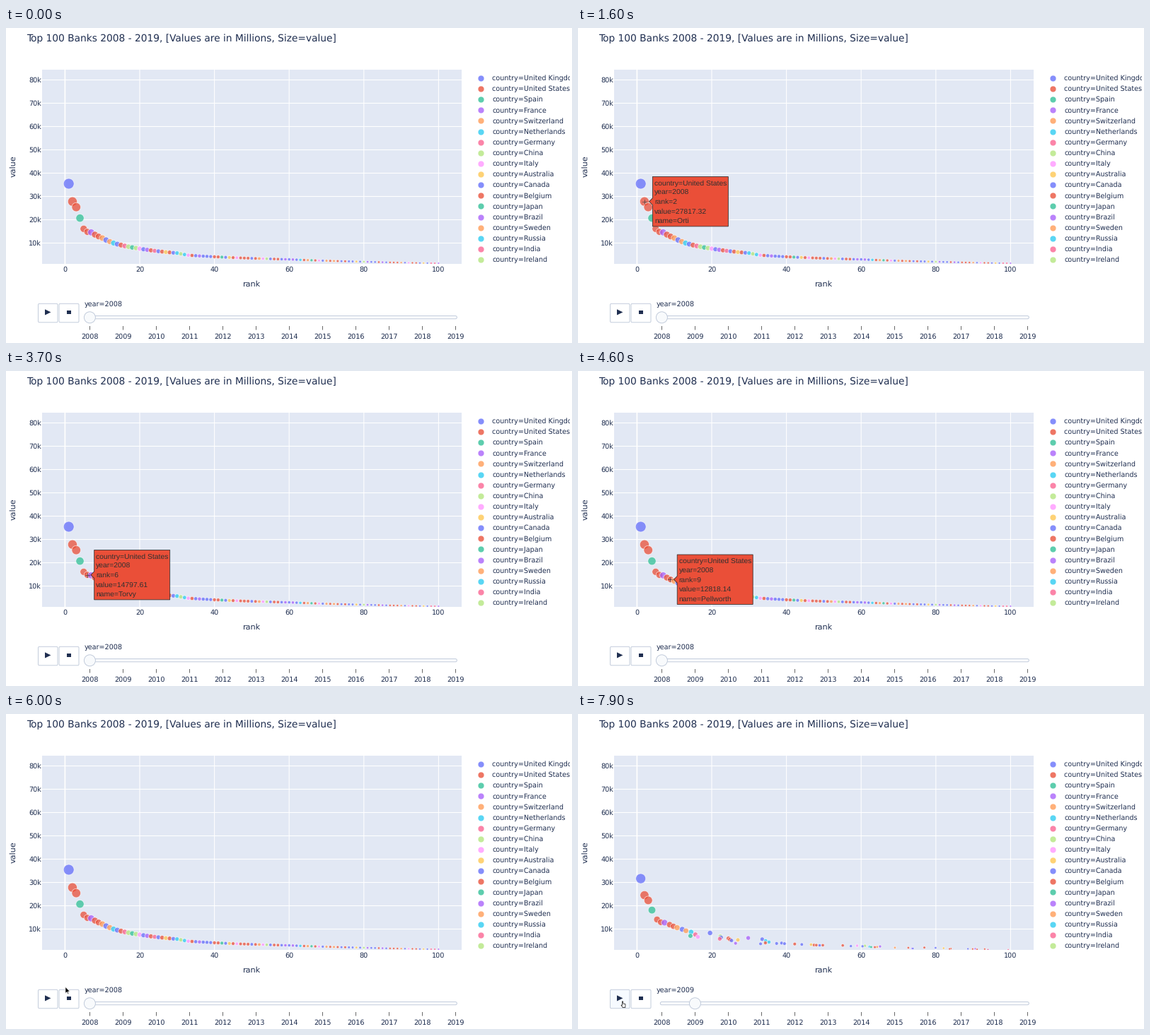
A matplotlib script that plays this animation: 800x446 px, repeating every 8000 ms.

```python
import numpy as np
import matplotlib.pyplot as plt
from matplotlib.animation import FuncAnimation
from matplotlib.patches import Circle, FancyBboxPatch, Polygon, Rectangle

W, H, DPI = 800, 446, 100
PX = 72 / DPI
FRAMES, STEP = 80, 100

INK, BORDER, PLOT_BG, DARK = "#1f2e50", "#bec8d9", "#e2e8f4", "#303030"
PALETTE = dict(zip("brgpocklmy", [
    "#636efa", "#ea4f38", "#30c096", "#a75ffa", "#ff9a54",
    "#2acbf2", "#fa6290", "#b2e67c", "#ff95ff", "#fec64e"]))
CODES = list(PALETTE)
COUNTRIES = ["United Kingdom", "United States", "Spain", "France", "Switzerland",
             "Netherlands", "Germany", "China", "Italy", "Australia", "Canada",
             "Belgium", "Japan", "Brazil", "Sweden", "Russia", "India", "Ireland"]
BANKS = ["Crownhall", "Orti", "Bank of Meldora", "Banco Velmar", "Fenwold",
         "Torvy", "Credit Lorvane", "Hadley Rusk", "Pellworth",
         "Credit Savrel", "Ashmere", "Zolbank", "DRN"]

plt.rcParams.update({"font.family": "DejaVu Sans", "text.hinting": "none"})
rng = np.random.default_rng(8)


def sx(rank):
    return 83.4 + 5.28 * np.asarray(rank, float)


def sy(value):
    return 337.5 - 0.0033 * np.asarray(value, float)


def diameter(value):
    return 14.9 * np.sqrt(np.asarray(value, float) / 35456)


def curve(rank):
    """Value by rank: piecewise power law through a few key banks."""
    knots = [1, 2, 3, 4, 5, 6, 7, 10, 13, 20, 30, 33, 60, 80, 100]
    levels = [35456.28, 27817.32, 25417.05, 20718.44, 16108.91, 14797.61, 14593.26,
              12139.77, 10006.54, 7600, 5700, 4800, 3000, 2000, 1330]
    return np.exp(np.interp(np.log(rank), np.log(knots), np.log(levels)))


# First year
ranks = np.arange(1, 101)
values = curve(ranks)
codes = list("brrgrrprrobocbrklglmbpr")
codes += list(rng.choice(list("rrrrrbbbgpcklmoy"), 100 - len(codes)))

# Second year: leaders slip a little, the rest reshuffle, some drop out
leaders = ranks <= 12
stays = leaders | (rng.random(100) < 0.62)
slips = np.where(leaders, np.maximum((ranks - 2) // 3, 0),
                 np.rint(rng.normal(2, 9, 100)))
next_ranks = np.clip(ranks + slips, 1, 100)
next_values = values * (0.65 + 0.06 / ranks)

fig = plt.figure(figsize=(W / DPI, H / DPI), dpi=DPI, facecolor="white")
ax = fig.add_axes([0, 0, 1, 1])
ax.set(xlim=(0, W), ylim=(H, 0))
ax.axis("off")


def label(x, y, text, size=9.6, ha="left", color=INK, **kw):
    return ax.text(x, y + 0.33 * size, text, fontsize=size * PX, ha=ha,
                   va="baseline", color=color, **kw)


def rule(xs, ys, color, width, **kw):
    ax.plot(xs, ys, color=color, lw=width * PX, solid_capstyle="butt", snap=False, **kw)


def box(x, y, w, h, r, **kw):
    style = f"round,pad=0,rounding_size={r}"
    return ax.add_patch(FancyBboxPatch((x, y), w, h, boxstyle=style,
                                       lw=0.9 * PX, ec=BORDER, **kw))


# Plot area
area = ax.add_patch(Rectangle((51, 59), 593, 275, fc=PLOT_BG, lw=0, zorder=0))
for r in range(0, 101, 20):
    rule([sx(r)] * 2, [59, 334], "white", 1.7 if r == 0 else 1.1, zorder=1)
    label(sx(r), 341.5, str(r), ha="center")
for k in range(10, 81, 10):
    y = sy(k * 1000)
    rule([51, 644], [y, y], "white", 1.1, zorder=1)
    label(50, y, f"{k}k", ha="right")

label(28.8, 15, "Top 100 Banks 2008 - 2019, [Values are in Millions, Size=value]", 13.8)
label(347.5, 362.6, "rank", 11.2, ha="center")
ax.text(10, 195.7, "value", fontsize=11.2 * PX, rotation=90, ha="center",
        va="center", color=INK)

# Legend
legend_area = Rectangle((650, 50), 146.5, 300, transform=ax.transData)
for i, country in enumerate(COUNTRIES):
    y = 71 + 15.12 * i
    ax.scatter([671.3], [y], s=(8.8 * PX) ** 2, c=PALETTE[CODES[i % 10]],
               alpha=0.78, edgecolors="white", linewidths=0.6 * PX)
    entry = label(687, y, f"country={country}", clip_on=True)
    entry.set_clip_path(legend_area)

# Controls
play = box(45.5, 390.3, 27.5, 26.5, 1.6, fc="white")
box(75, 390.3, 28, 26.5, 1.6, fc="white")
ax.add_patch(Polygon([(55, 398.3), (63.4, 402.4), (55, 406.5)], fc=INK, lw=0, zorder=3))
ax.add_patch(Rectangle((86.3, 399.9), 5.3, 5.3, fc=INK, lw=0, zorder=3))
box(116.3, 407.6, 521, 4.2, 2, fc="#f9fbfd")
for i in range(12):
    x = 118.4 + 47 * i
    rule([x, x], [422, 427.5], "#444444", 0.8)
    label(x, 436.7, str(2008 + i), ha="center")
grip = ax.add_patch(Circle((118.4, 409.8), 8, fc="#f8fafc", ec=BORDER,
                           lw=0.9 * PX, zorder=4))
year_label = label(110.5, 391.2, "")

dots = ax.scatter([], [], linewidths=0.75 * PX, edgecolors="white", alpha=0.75, zorder=5)
dots.set_clip_path(area)

# Hover label
tip = ax.add_patch(Polygon([(0, 0)] * 3, lw=0.8 * PX, zorder=8))
lines = [label(0, 0, "", 10.35, family="Liberation Sans", zorder=9) for _ in range(5)]

# Pointer shapes
cross = ax.plot([], [], color="#444444", lw=0.7 * PX, zorder=10)[0]
ARROW = np.array([(0, 0), (0, 9.5), (2.2, 7.5), (3.8, 10.8), (5.2, 10.2),
                  (3.7, 7), (6.6, 6.8)])
HAND = np.array([(-1.6, -3), (-0.4, -3), (-0.2, 0), (3, 0.8), (2.8, 5.5),
                 (-0.8, 5.5), (-3, 2.2), (-1.4, 2.2)])
pointer = ax.add_patch(Polygon(ARROW, zorder=10, joinstyle="round"))

# The pointer rides the curve from bank to bank, then goes to the play button
RIDE_TIMES = [800, 1100, 1500, 2000, 2500, 2800, 3700, 5000, 5200, 5500]
RIDE_RANKS = [1, 1, 2, 2, 3, 3.2, 6, 10, 10, 13]
ENTER, LEAVE, ARRIVE, PLAY_AT = 800, 5550, 6200, 7715
BUTTON = np.array([64, 410])


def ride_rank(t):
    return np.interp(t, RIDE_TIMES, RIDE_RANKS)


def draw_hover(rank):
    tip.set_visible(rank > 0)
    for line in lines:
        line.set_visible(rank > 0)
    if not rank:
        return
    code, value = codes[rank - 1], values[rank - 1]
    x, y, r = sx(rank), sy(value), diameter(value) / 2
    ink = "white" if code == "b" else DARK
    left = x + r + 4.8
    rows = [f"country={COUNTRIES[CODES.index(code)]}", "year=2008", f"rank={rank}",
            f"value={value:.2f}", f"name={BANKS[rank - 1]}"]
    width = 0
    for i, (line, row) in enumerate(zip(lines, rows)):
        line.set_text(row)
        line.set_color(ink)
        line.set_position((left + 2.5, y + 13.4 * (i - 2) + 3.7))
        width = max(width, line.get_window_extent().width * DPI / fig.dpi)
    right, top, bottom = left + width + 4.6, y - 35.2, y + 35.2
    tip.set_xy([(x + r, y), (left, y - 4.8), (left, top), (right, top),
                (right, bottom), (left, bottom), (left, y + 4.8)])
    tip.set(fc=PALETTE[code], ec=ink)


def draw_pointer(t):
    rank = ride_rank(t)
    u = np.clip((t - LEAVE) / (ARRIVE - LEAVE), 0, 1)
    start = np.array([sx(rank), sy(curve(rank))])
    x, y = start + (BUTTON - start) * u * u * (3 - 2 * u)
    shown, inside = t >= ENTER, y < 334
    cross.set_visible(shown and inside)
    cross.set_data([x - 3, x + 3, np.nan, x, x], [y, y, np.nan, y - 3, y + 3])
    on_button = y > 390 and x < 73
    pointer.set_visible(shown and not inside)
    pointer.set_xy((HAND if on_button else ARROW) + (x, y))
    pointer.set(fc="white" if on_button else "black",
                ec="#222222" if on_button else "white", lw=0.8 * PX)
    play.set_facecolor("#f6faff" if on_button else "white")


def draw_dots(t):
    moving = t > PLAY_AT
    p = (t - PLAY_AT) / 500 if moving else 0
    keep = stays if moving else np.full(100, True)
    r = (ranks + (next_ranks - ranks) * p)[keep]
    v = (values + (next_values - values) * p)[keep]
    dots.set_offsets(np.column_stack([sx(r), sy(v)]))
    dots.set_sizes((diameter(v) * PX) ** 2)
    dots.set_facecolor([PALETTE[c] for c in np.array(codes)[keep]])
    year_label.set_text("year=2009" if moving else "year=2008")
    grip.set_center((118.4 + 47 * np.clip((t - PLAY_AT) / 150, 0, 1), 409.8))


def update(n):
    t = n * STEP
    draw_dots(t)
    draw_hover(int(np.rint(ride_rank(t))) if ENTER <= t <= LEAVE else 0)
    draw_pointer(t)
    return []


anim = FuncAnimation(fig, update, frames=FRAMES, interval=STEP, repeat=True,
                     repeat_delay=0, init_func=lambda: update(0))
plt.show()
```
